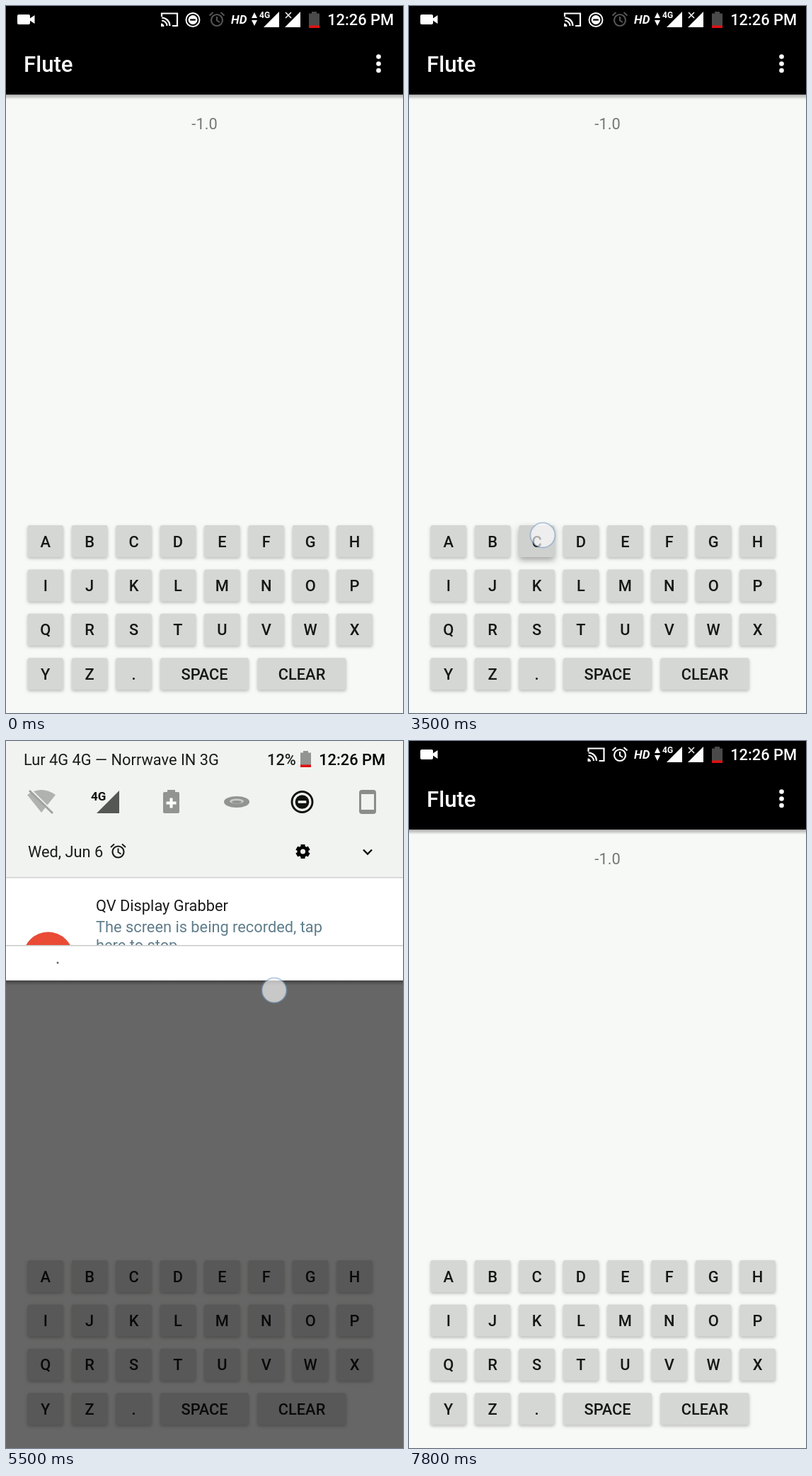
These frames come from a looping animation (561x998 px, 8 s). An HTML page with a canvas:

```html
<!DOCTYPE html>
<html lang="en">
<head>
<meta charset="utf-8">
<title>Keyboard and notification shade</title>
<style>
html, body { margin: 0; width: 100%; height: 100%; overflow: hidden; background: #f7f9f6; }
canvas { display: block; width: 561px; height: 998px; }
</style>
</head>
<body>
<canvas id="stage" width="561" height="998"></canvas>
<script>
const ctx = document.getElementById('stage').getContext('2d');
const W = 561, H = 998, LOOP = 8000, STEP = 100, OPEN = 493;
const PAPER = '#f7f9f6', PANEL = '#f1f3f0', GREY = '#929491', INK = '#1b1d1b', SLATE = '#607d8b';

// Key taps: letter, start, end, x, y, drift in x and y
const TAPS = [
  ['A', 1600, 1900, 72, 736, 10, -19],
  ['B', 2500, 2700, 128, 745, 3, -3],
  ['C', 3500, 3700, 189, 747, 3, -2],
  ['D', 4200, 4400, 250, 749, 3, -2]
];
// Shade height over time
const SHADE = [[5200, 0], [5300, 45], [5400, 185], [5500, 338], [5600, OPEN],
  [7200, OPEN], [7300, 400], [7400, 240], [7500, 90], [7600, 0]];
// Finger strokes: points of time, x, y
const STROKES = [
  [[5200, 436, 22], [5300, 425, 86], [5400, 402, 216], [5500, 379, 352], [5600, 360, 480]],
  [[6200, 420, 87], [6300, 420, 87]],
  [[7100, 300, 590], [7200, 305, 500], [7300, 312, 370], [7400, 318, 230]]
];

function track(points, t, i = 1) {
  const n = points.findIndex(p => p[0] >= t);
  if (n < 0) return points[points.length - 1][i];
  if (!n) return points[0][i];
  const a = points[n - 1], b = points[n];
  return a[i] + (b[i] - a[i]) * (t - a[0]) / (b[0] - a[0]);
}
function rect(x, y, w, h, color) {
  ctx.fillStyle = color;
  ctx.fillRect(x, y, w, h);
}
function round(x, y, w, h, r, color) {
  ctx.beginPath();
  ctx.roundRect(x, y, w, h, r);
  ctx.fillStyle = color;
  ctx.fill();
}
function disc(x, y, r, color, ry = r) {
  ctx.beginPath();
  ctx.ellipse(x, y, r, ry, 0, 0, 7);
  ctx.fillStyle = color;
  ctx.fill();
}
function ring(x, y, r, color, width) {
  ctx.beginPath();
  ctx.arc(x, y, r, 0, 7);
  ctx.strokeStyle = color;
  ctx.lineWidth = width;
  ctx.stroke();
}
function shape(d, color, x = 0, y = 0) {
  ctx.save();
  ctx.translate(x, y);
  ctx.fillStyle = color;
  ctx.fill(new Path2D(d));
  ctx.restore();
}
function line(d, color, width, x = 0, y = 0) {
  ctx.save();
  ctx.translate(x, y);
  ctx.strokeStyle = color;
  ctx.lineWidth = width;
  ctx.stroke(new Path2D(d));
  ctx.restore();
}
function text(s, x, y, size, color, weight = 400, align = 'left') {
  ctx.font = `${weight} ${size}px Roboto, sans-serif`;
  ctx.textAlign = align;
  ctx.fillStyle = color;
  ctx.fillText(s, x, y);
}
function shadow(y, size, alpha) {
  const g = ctx.createLinearGradient(0, y, 0, y + size);
  g.addColorStop(0, `rgba(0,0,0,${alpha})`);
  g.addColorStop(1, 'rgba(0,0,0,0)');
  rect(0, y, W, size, g);
}

function camera(y, color) {
  round(16, y, 18, 14, 2, color);
  shape('M33 6 L40.500 1 V13 L33 8 Z', color, 0, y);
}
function alarm(x, y, color) {
  ring(x, y + 1, 8, color, 2.2);
  line('M-10.500 -5.500 L-5.500 -10 M10.500 -5.500 L5.500 -10 M0 -4 V1.500 L4 4', color, 2, x, y);
}
function disturb(x, y, r, color, back) {
  ring(x, y, r, color, r * .2);
  disc(x, y, r * .68, color);
  rect(x - r * .4, y - r * .12, r * .8, r * .24, back);
}
function slash(x, y, color) {
  line('M-18 -13 L14 19', PANEL, 4, x + 2, y - 3);
  line('M-17 -15 L16 17', color, 3, x, y);
}

function statusBar(quiet) {
  camera(12, '#fff');
  const x = quiet ? 0 : 33.5;
  line('M220 15 V10.500 H242 V28 H235 M220 20.500 A7.500 7.500 0 0 1 227.500 28 M220 16.500 A11.500 11.500 0 0 1 231.500 28', '#fff', 2.2, x);
  shape('M219 24.500 A4.500 4.500 0 0 1 223.500 29 H219 Z', '#fff', x);
  if (quiet) disturb(264, 19.500, 9.500, '#fff', '#000');
  alarm(298, 19, quiet ? '#555' : '#fff');
  text('HD', 318, 25, 17, '#fff', 'italic 700');
  shape('M347 17 L351 9 L355 17 Z M347 20 L351 28 L355 20 Z', '#fff');
  shape('M386 8 V30 H364 Z M416 8 V30 H394 Z', '#fff');
  rect(357, 6, 16, 13, '#000');
  text('4G', 358, 17, 12, '#fff', 700);
  rect(393, 7, 12, 12, '#000');
  line('M395 9 L403 17 M403 9 L395 17', '#fff', 1.5);
  battery(428, 8, '#4a4a4a');
  text('12:26 PM', 548, 27, 21.800, '#fff', 500, 'right');
}
function battery(x, y, color) {
  rect(x + 4, y, 7, 4, color);
  rect(x, y + 2.500, 15, 18, color);
  rect(x, y + 19.500, 15, 3.500, '#e01010');
}

function key(label, x, y, w, t) {
  const tap = TAPS.find(k => k[0] === label && t >= k[1] && t < k[2]);
  const lifted = tap && t - tap[1] < 200;
  ctx.save();
  ctx.shadowColor = lifted ? 'rgba(0,0,0,.35)' : 'rgba(0,0,0,.25)';
  ctx.shadowBlur = lifted ? 9 : 4;
  ctx.shadowOffsetY = lifted ? 4 : 2;
  round(x, y, w, 45, 3, !tap ? '#d5d7d4' : lifted ? '#cfd1ce' : '#c6c8c6');
  ctx.restore();
  text(label, x + w / 2, y + 30.500, 21.800, '#151715', 500, 'center');
}
function app(t, quiet) {
  rect(0, 0, W, H, PAPER);
  rect(0, 0, W, 125, '#000');
  shadow(125, 7, .32);
  statusBar(quiet);
  text('Flute', 25, 93, 31.200, '#fff', 500);
  for (const y of [71.500, 81.500, 91]) disc(526.500, y, 3.300, '#fff');
  text('-1.0', 280.500, 173.500, 21.800, '#757775', 400, 'center');
  [...'ABCDEFGHIJKLMNOPQRSTUVWXYZ.'].forEach((c, i) =>
    key(c, 30.500 + i % 8 * 62.400, 733 + (i >> 3) * 62.400, 50.500, t));
  key('SPACE', 218, 920.200, 125, t);
  key('CLEAR', 355.500, 920.200, 125, t);
}

function quickSettings(quiet) {
  rect(0, 0, W, 193, PANEL);
  text('Lur 4G 4G — Norrwave IN 3G', 25, 33.500, 21.800, INK);
  text('12%', 369, 33.500, 21.800, INK, 500);
  battery(416, 14, GREY);
  text('12:26 PM', 536, 33.500, 21.800, '#000', 500, 'right');

  shape('M30 76 Q50 62 70 76 L50 101 Z', '#b0b2af');
  slash(50, 85, '#a0a29f');
  shape('M160 70 V102 H128 Z', '#555755');
  rect(119, 69, 22, 17, PANEL);
  text('4G', 120, 84, 17, '#111', 700);
  rect(228, 69, 11, 5, GREY);
  round(222, 72, 23, 30, 2, GREY);
  line('M233.500 80.500 V94.500 M226.500 87.500 H240.500', '#fff', 4);
  disc(326, 86, 18, GREY, 8);
  disc(326, 85, 10, '#c9cbc8', 3.500);
  disc(326, 86, 7, GREY, 2);
  if (quiet) disturb(418.500, 86, 14.500, '#111', PANEL);
  else {
    disc(418.500, 86, 15, GREY);
    rect(410, 84, 17, 4, PANEL);
    slash(418.500, 86, GREY);
  }
  round(499, 69, 24, 34, 4, '#8b8d8a');
  rect(502, 75, 18, 22, PANEL);

  text('Wed, Jun 6', 31, 164, 21.800, INK);
  alarm(158.500, 155.500, INK);
  for (let i = 0; i < 6; i++) {
    const a = i * Math.PI / 3 + Math.PI / 6;
    line(`M0 0 L${10 * Math.cos(a)} ${10 * Math.sin(a)}`, '#000', 6, 419.500, 156);
  }
  disc(419.500, 156, 8, '#000');
  disc(419.500, 156, 3.500, PANEL);
  line('M505 153.500 L511 159.500 L517 153.500', '#111', 2.400);
}
function notifications() {
  rect(0, 193, W, 224, '#fff');
  rect(0, 192, W, 1.500, '#cfd1ce');
  text('QV Display Grabber', 127, 240, 21.800, INK);
  text('The screen is being recorded, tap', 127, 270, 21.800, SLATE);
  text('here to stop', 127, 295.500, 21.800, SLATE);
  disc(59.500, 305, 35.500, '#e94b35');
  rect(127, 324.500, 434, 1.500, '#dcdedb');
  rect(188, 347, 8, 27, '#ffc107');
  rect(201, 347, 8, 27, '#ffc107');
  rect(330, 347, 27, 27, '#ff5252');
  shape('M474 375 L477 364 L493 348 Q496 345 502 351 Q504 354 501 357 L485 372 Z', '#7e57b8');
  line('M480 366 L495 351 M484 369 L498 355', '#d9c9f2', 2);
  shape('M492 349 Q496 344 502 351 Q504 354 501 357 Z', '#6a7fa8');
  shape('M476 373 L478 366 L483 371 Z', '#f3e9dc');
  ['Pause', 'Stop', 'Draw'].forEach((s, i) =>
    text(s, 198.500 + i * 144.700, 396.500, 15.600, SLATE, 400, 'center'));

  rect(0, 417, W, 76, PANEL);
  rect(0, 416.500, W, 1.500, '#c3c5c2');
  shape('M39 443 L50 451.500 L39 460 L28 451.500 Z', '#666866');
  line('M29 457 L39 464.500 L49 457', '#666866', 2.500);
  text('Android Sys…', 62, 462, 18.700, '#757775');
  text('•', 184, 462, 18.700, '#757775', 400, 'center');
  text('QV Display Grabber is displaying ov…', 193, 462, 18.700, '#757775');
  line('M520 453.500 L525 458.500 L530 453.500', '#757775', 2);
}
function shade(h, quiet) {
  const strip = h < OPEN ? 50 : 0, edge = h - strip;
  rect(0, 0, W, H, `rgba(0,0,0,${.62 * Math.min(1, Math.max(0, h - 45) / 308)})`);
  shadow(h, 7, .35);
  if (edge > 0) {
    ctx.save();
    ctx.beginPath();
    ctx.rect(0, 0, W, edge);
    ctx.clip();
    ctx.translate(0, Math.min(0, edge - 193));
    quickSettings(quiet);
    notifications();
    ctx.restore();
  }
  if (!strip) return;
  rect(0, edge, W, strip, '#fff');
  rect(0, Math.max(0, edge), W, 1.500, '#c8cac7');
  disc(h < 60 ? 69 : 73, h - 25, 1.500, '#666');
  if (h < 60) camera(h - 31.500, '#6c6e6c');
}

function finger(x, y) {
  disc(x, y, 17, 'rgba(255,255,255,.64)');
  ring(x, y, 17.500, 'rgba(120,155,200,.5)', 2);
}
function touches(t) {
  for (const [, from, to, x, y, dx, dy] of TAPS) {
    if (t < from || t >= to) continue;
    const p = Math.min(1, (t - from) / 200);
    finger(x + dx * p, y + dy * p);
  }
  for (const s of STROKES)
    if (t >= s[0][0] && t <= s[s.length - 1][0]) finger(track(s, t, 1), track(s, t, 2));
}

function draw(now) {
  const t = Math.floor(now % LOOP / STEP) * STEP;
  const quiet = t < 6300, h = track(SHADE, t);
  app(t, quiet);
  if (h > 0) shade(h, quiet);
  touches(t);
}
let start;
function frame(now) {
  start ??= now;
  draw(now - start);
  requestAnimationFrame(frame);
}
requestAnimationFrame(frame);
</script>
</body>
</html>
```
